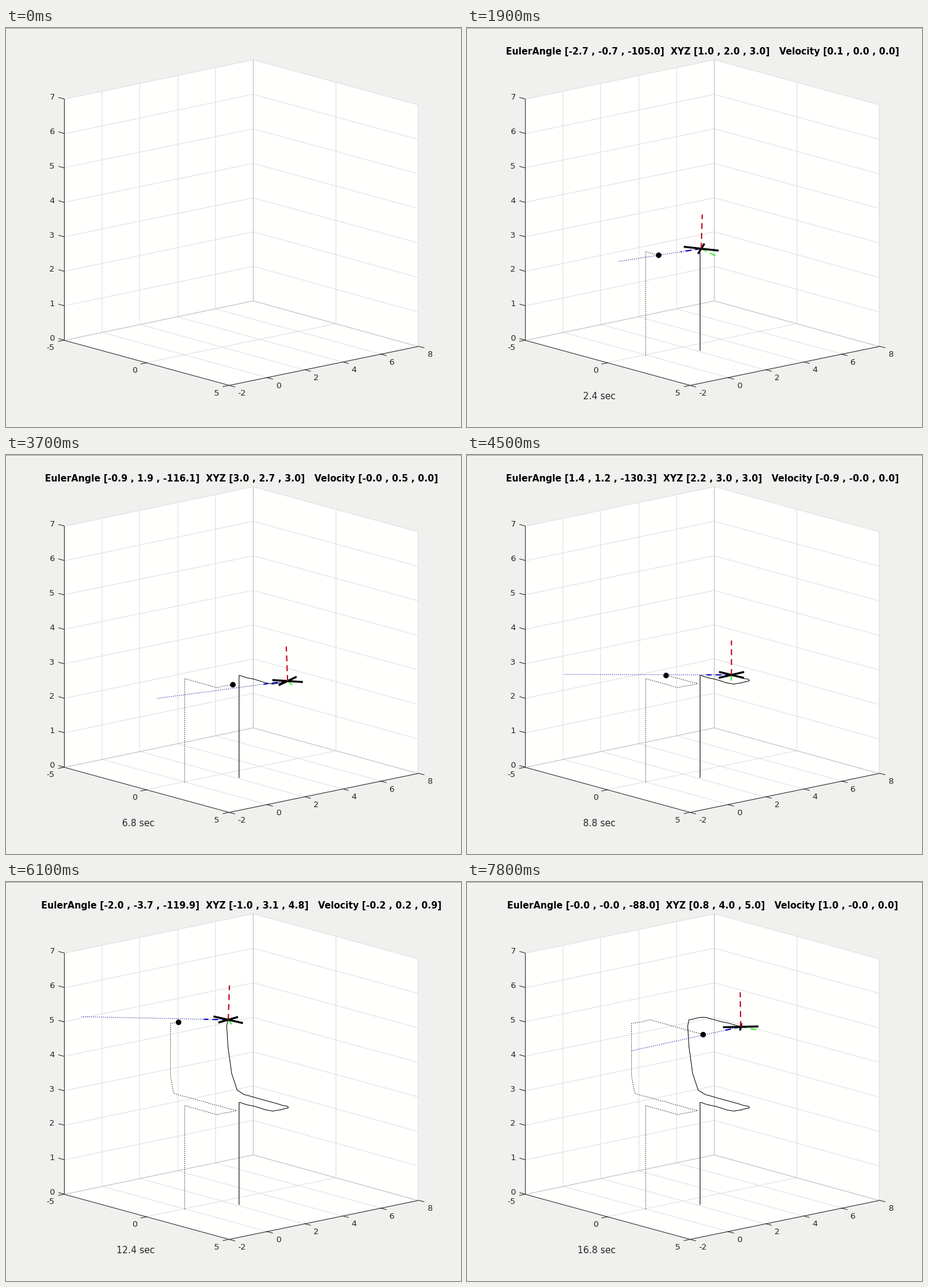
Write a matplotlib script that moves like this. It is 737 px wide and 647 px high and loops after 8 s.

```python
import numpy as np
import matplotlib.pyplot as plt
from matplotlib.animation import FuncAnimation

W, H, DPI = 737, 647, 96
PX = 72 / DPI
INK = "#262626"

DT = 0.4            # simulated seconds per step
STEP = 1.638        # animation frames per step
START = 8.65        # animation frame of the first step
GRAVITY = 9.81
AIM_LEAD = 0.07     # the camera aims slightly ahead of its target

plt.rcParams["font.family"] = "DejaVu Sans"
plt.rcParams["lines.scale_dashes"] = False
plt.rcParams["lines.dash_capstyle"] = "butt"
plt.rcParams["path.snap"] = False

# Target waypoints: time, x, y, z.
TARGET = np.array([
    (0, 0, 0, 0), (1.6, 0, 0, 3), (3.6, 2, 0, 3), (5.2, 2, 0, 3),
    (7.2, 2, 1, 3), (10.55, -2, 1, 3), (11.6, -2, 1, 5), (13.6, -2, 2, 5),
    (17.6, 2, 2, 5)]).T

# Drone commands per axis: smoothing time, then (time, position) points.
# The level stretches sag a little.
DRONE = [
    (1.6, [(2.68, 1), (4.68, 3), (7.58, 3), (11.58, -1), (14.6, -1),
           (17.6, 2)]),
    (1.6, [(3.3, 2), (5.25, 1.99), (6.9, 3), (12.2, 2.99), (13.85, 4),
           (17.2, 3.99)]),
    (0.8, [(0.3, 0), (1.3, 3), (10.97, 3), (11.95, 5), (14.6, 4.99)]),
]


def target_at(t):
    return np.array([np.interp(t, TARGET[0], axis) for axis in TARGET[1:]])


def drone_at(t):
    """Commanded path, averaged over each axis' smoothing time."""
    t = np.asarray(t, float)[..., None]
    spread = np.linspace(-0.5, 0.5, 41)
    return np.array([np.interp(t + w * spread, *zip(*keys)).mean(axis=-1)
                     for w, keys in DRONE])


def velocity(t):
    return (drone_at(t + DT) - drone_at(t - DT)) / (2 * DT)


def attitude(t):
    """Roll, pitch, yaw: face the target and lean into the acceleration."""
    pos = drone_at(t)
    dx, dy, _ = target_at(t + AIM_LEAD) - pos
    yaw = np.arctan2(dy, dx)
    ax_, ay, _ = (drone_at(t + DT) - 2 * pos + drone_at(t - DT)) / DT ** 2
    c, s = np.cos(yaw), np.sin(yaw)
    pitch = np.arcsin((ax_ * c + ay * s) / GRAVITY)
    roll = np.arcsin((ax_ * s - ay * c) / GRAVITY)
    return np.array([roll, pitch, yaw])


def body_axes(angles):
    """Body x, y and z axes in world coordinates."""
    (cr, cp, cy), (sr, sp, sy) = np.cos(angles), np.sin(angles)
    rz = np.array([[cy, -sy, 0], [sy, cy, 0], [0, 0, 1]])
    ry = np.array([[cp, 0, sp], [0, 1, 0], [-sp, 0, cp]])
    rx = np.array([[1, 0, 0], [0, cr, -sr], [0, sr, cr]])
    return (rz @ ry @ rx).T


def project(p):
    x, y, z = p
    return np.array([93.9 + 26.67 * (x + 5) + 30.65 * (y + 2),
                     505.7 + 7.33 * (x + 5) - 6.35 * (y + 2) - 55.86 * z])


fig = plt.figure(figsize=(W / DPI, H / DPI), dpi=DPI, facecolor="#f0f0ee")
ax = fig.add_axes([0, 0, 1, 1])
ax.set_xlim(-0.5, W - 0.5)
ax.set_ylim(H - 0.5, -0.5)
ax.axis("off")


def line(color, width=1, style="-", pts=()):
    xy = np.array([project(p) for p in pts]).reshape(-1, 2).round()
    return ax.plot(xy[:, 0], xy[:, 1], color=color, lw=width * PX, ls=style,
                   solid_capstyle="butt")[0]


def label(x, y, text, ha, size=10, **kw):
    return ax.text(x, y, text, ha=ha, va="baseline", fontsize=size, **kw)


def tick(p, dx, dy):
    x, y = project(p)
    ax.plot([x, x + dx], [y, y + dy], color=INK, lw=PX)
    return x, y


def draw_box():
    ax.plot([-1, W], [0, 0], color="#a0a0a0", lw=PX)
    outline = [(-5, -2, 7), (-5, 8, 7), (5, 8, 7), (5, 8, 0), (5, -2, 0),
               (-5, -2, 0)]
    ax.fill(*zip(*map(project, outline)), color="#fffffe", lw=0)
    grid, edge = "#dedede", "#b8b8b8"
    for z in range(1, 8):
        line(grid, pts=[(-5, -2, z), (-5, 8, z), (5, 8, z)])
    for y in range(0, 8, 2):
        line(grid, pts=[(5, y, 0), (-5, y, 0), (-5, y, 7)])
    for x in (0, 5):
        line(grid, pts=[(x, -2, 0), (x, 8, 0), (x, 8, 7)])
    line(edge, pts=[(-5, -2, 0), (-5, 8, 0), (5, 8, 0)])
    line(edge, pts=[(-5, 8, 0), (-5, 8, 7)])
    line(INK, pts=[(-5, -2, 7), (-5, -2, 0)])
    line(INK, pts=[(-5, -2, 0), (5, -2, 0), (5, 8, 0)])

    for z in range(8):
        x, y = tick((-5, -2, z), -9, -2.5)
        label(x - 15.5, y + 1, str(z), "right", color=INK)
    for v in (-5, 0, 5):
        x, y = tick((v, -2, 0), -9.5, 2)
        label(x - 15.5, y + 16, str(v), "right", color=INK)
    for v in range(-2, 9, 2):
        x, y = tick((5, v, 0), 9.5, 2.5)
        label(x + 14.3, y + 17, str(v), "left", color=INK)


draw_box()
dots = (0, (1.2 * PX, 2 * PX))
dashes = (0, (9.5 * PX, 6.5 * PX))
drone_trail = line("black")
target_trail = line("black", style=dots)
ray = line("#000099", style=dots)
nose = line("#0000c0", 2, dashes)
side = line("#30f030", 2, dashes)
arms = [line("black", 3.2) for _ in range(2)]
mast = line("#c00014", 2, dashes)
ball, = ax.plot([], [], "o", color="black", ms=9 * PX, mew=0)
title = label(381, 43, "", "center", 11, weight="bold", color="black")
clock = label(240.5, 602, "", "right", 11, color=INK)
moving = [drone_trail, target_trail, ray, nose, side, *arms, mast, ball,
          title, clock]


def put(art, *pts):
    art.set_data(*zip(*map(project, pts)))


def ray_end(p, d):
    """Follow d from p until it leaves the floor area of the box."""
    reach = [((5 if d[0] > 0 else -5) - p[0]) / d[0],
             ((8 if d[1] > 0 else -2) - p[1]) / d[1]]
    return p + d * min(reach)


def triple(values):
    return "[" + " , ".join(f"{v:.1f}" for v in values) + "]"


def update(i):
    k = int(np.floor((i - START) / STEP))
    for art in moving:
        art.set_visible(k >= 0)
    if k < 0:
        return moving

    t = k * DT
    past = np.arange(k + 1) * DT
    drone_trail.set_data(*project(drone_at(past)).round())
    target_trail.set_data(*project(target_at(past)).round())
    put(ball, target_at(t))

    p = drone_at(t)
    bx, by, bz = body_axes(attitude(t))
    put(ray, p, ray_end(p, bx))
    put(nose, p, p + bx)
    put(side, p, p + by)
    put(mast, p, p + bz)
    for art, arm in zip(arms, ((bx + by) / 2, (bx - by) / 2)):
        put(art, p - arm, p + arm)

    # The readout lags the drawing by one step.
    s = t - DT
    title.set_text(f"EulerAngle {triple(np.degrees(attitude(s)))}"
                   f"  XYZ {triple(drone_at(s))}"
                   f"   Velocity {triple(velocity(s))}")
    clock.set_text(f"{t:.1f} sec")
    return moving


anim = FuncAnimation(fig, update, frames=80, interval=100, repeat=True,
                     repeat_delay=0, init_func=lambda: update(0), blit=False)
plt.show()
```
